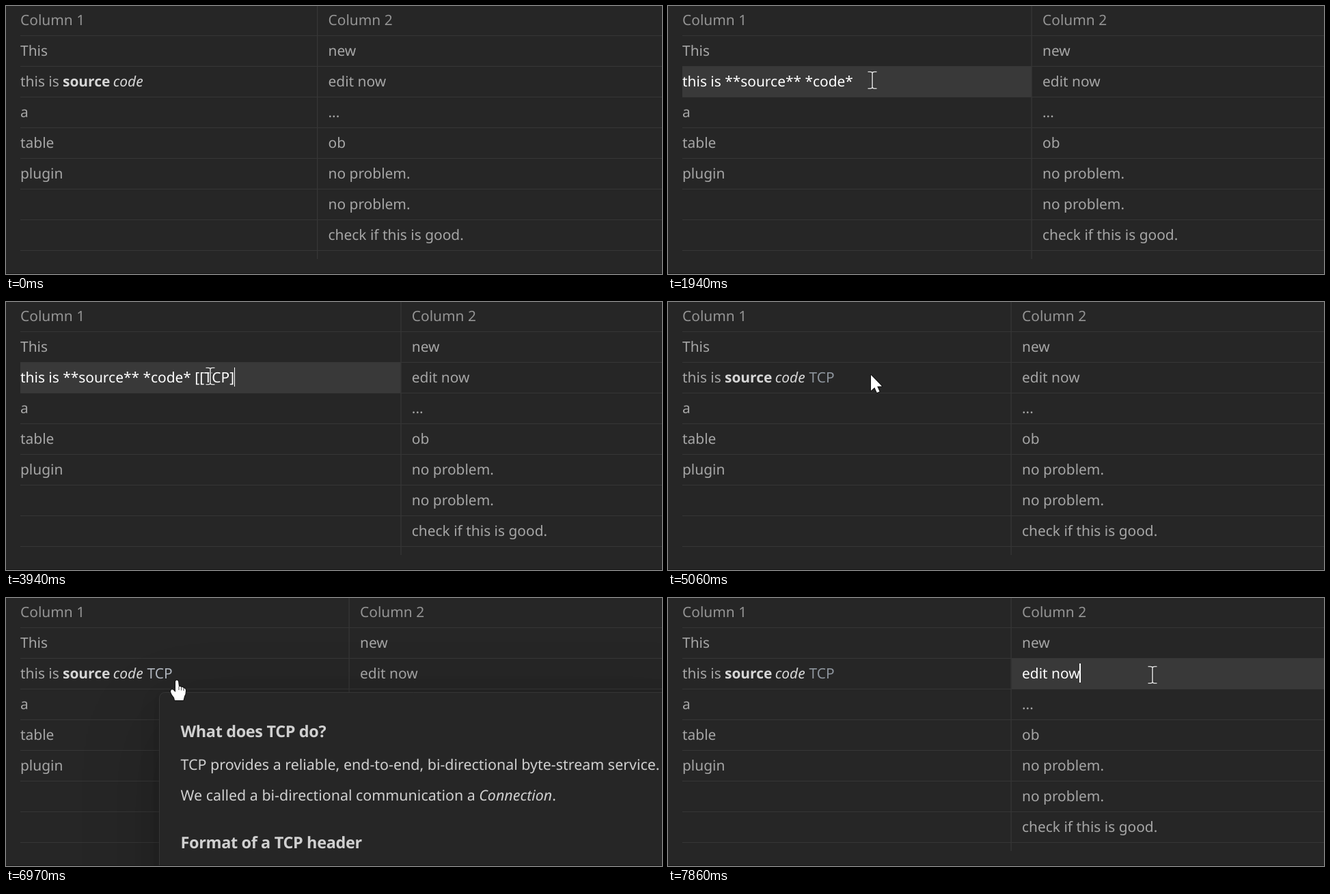
Write an HTML page with a canvas that moves like this. It is 960 px wide and 393 px high and loops after 8 s.

```html
<!DOCTYPE html>
<html lang="en">
<head>
<meta charset="utf-8">
<title>Editable table</title>
<style>
html, body { margin: 0; width: 100%; height: 100%; overflow: hidden; background: #262626; }
canvas { display: block; }
</style>
</head>
<body>
<canvas id="stage" width="960" height="393"></canvas>
<script>
const ctx = document.getElementById('stage').getContext('2d');
const LOOP = 8000, LEFT = 21, ROW = 45, SIZE = 20.93;
const FAMILY = '"Noto Sans", sans-serif';
const CELL = '#a6a6a6', LINE = '#363636', ACTIVE = '#393939', BRIGHT = '#d6d6d6';

const col1 = ['Column 1', 'This', '', 'a', 'table', 'plugin'];
const col2 = ['Column 2', 'new', 'edit now', '...', 'ob', 'no problem.', 'no problem.', 'check if this is good.'];

// Time, typed text after the base, divider position
const typing = [
  [800, '', 528], [1410, ' ', 532], [2210, ' [', 538], [2340, ' [[', 544.5],
  [3070, ' [[T', 553.3], [3270, ' [[TC', 563], [3540, ' [[TCP', 572],
  [3940, ' [[TCP]', 577.8], [4070, ' [[TCP]]', 582.3]
];
const EDIT_START = 800, EDIT_END = 5060, BLINK = 530;

// Pointer moves: start, end, number of steps, cubic Bezier points
const moves = [
  [120, 600, 8, [807, 385], [600, 260], [330, 110], [297, 107]],
  [5340, 6040, 11, [298, 112], [328, 165], [310, 195], [246, 119]],
  [6970, 7530, 9, [250, 121], [40, 108], [480, 112], [707, 111]]
];

// Popup shadow layers: offset, blur, opacity
const shadows = [[39, 118, 0.2], [8, 32, 0.11], [2.4, 9.5, 0.07]];

const arrow = new Path2D('M0 0V23L5.3 18.2L8.8 26L12.6 24.3L9.2 16.8L16 16.5Z');
const beam = new Path2D('M-6.5-12H-3Q0-12 0-9.5Q0-12 3-12H6.5M0-10V11M-6.5 12.5H-3Q0 12.5 0 10Q0 12.5 3 12.5H6.5');
const hand = new Path2D('M-2 1Q0-2 2 1L3 9Q5 8 6.5 10Q9 9 10 11.5Q13 11 13 15Q13 20 11 23L9.5 29H-3L-4 25Q-9 19 -9 15.5Q-8 12 -5 14L-2 17Z');

function text(str, x, y, color = CELL, style = '', size = SIZE) {
  ctx.font = `${style} ${size}px ${FAMILY}`;
  ctx.fillStyle = color;
  ctx.fillText(str, x, y);
  return x + ctx.measureText(str).width;
}

function rect(color, x, y, w, h) {
  ctx.fillStyle = color;
  ctx.fillRect(x, y, w, h);
}

function pointerAt(t) {
  const move = moves.filter(m => t >= m[0]).pop();
  if (!move) return null;
  const [start, end, steps, ...p] = move;
  const u = Math.min(1, Math.floor((t - start) / (end - start) * (steps - 1) + 0.01) / (steps - 1));
  const v = 1 - u;
  return [0, 1].map(k =>
    v * v * v * p[0][k] + 3 * v * v * u * p[1][k] + 3 * v * u * u * p[2][k] + u * u * u * p[3][k]);
}

function drawTable(t) {
  const typed = typing.filter(e => t >= e[0]).pop();
  const editing = t >= EDIT_START && t < EDIT_END;
  const editing2 = t >= 7730;
  const divider = t < EDIT_START ? 455.5 : editing ? typed[2] : 502;

  if (editing) rect(ACTIVE, LEFT, 89, divider - LEFT, 44);
  if (editing2) rect(ACTIVE, divider + 1, 89, 960 - divider, 44);
  for (let y = 43; y < 370; y += ROW) rect(LINE, LEFT, y, 939, 1);
  rect(LINE, divider - 0.5, 0, 1.3, 371);
  rect('#181818', 0, 392, 960, 1);

  const draw = (str, x, i) =>
    text(str, x, 28 + ROW * i, i === 0 ? '#949494' : editing2 && i === 2 && x > 400 ? '#fff' : CELL);
  col1.forEach((s, i) => draw(s, LEFT, i));
  col2.forEach((s, i) => draw(s, divider + 16, i));

  if (editing) {
    const end = text('this is **source** *code*' + typed[1], LEFT, 118, '#fff');
    if (t - typed[0] < BLINK || typed === typing[0]) rect('#fff', Math.floor(end), 96, 1, 28);
  } else {
    text('this is', LEFT, 118);
    text('source', 83, 118, BRIGHT, '600');
    text('code', 156.8, 118, BRIGHT, 'italic');
    if (t >= EDIT_END) text('TCP', 206.6, 118, t >= 6040 && t < 7040 ? '#b2b8c0' : '#8e959d');
  }
  if (t >= 7800) rect('#fff', 602, 96, 2, 28);
}

function drawPopup(t) {
  if (t < 6170 || t >= 7180) return;
  ctx.save();
  ctx.globalAlpha = t < 6240 ? 0.5 : 1;
  ctx.beginPath();
  ctx.roundRect(224.5, 138.5, 800, 520, 8);
  ctx.fillStyle = '#262626';
  for (const [offset, blur, opacity] of shadows) {
    ctx.shadowOffsetY = offset;
    ctx.shadowBlur = blur;
    ctx.shadowColor = `rgba(0,0,0,${opacity})`;
    ctx.fill();
  }
  ctx.shadowColor = 'transparent';
  ctx.strokeStyle = LINE;
  ctx.stroke();

  const x = 255.5, size = 21.43, color = '#d0d0d0';
  ctx.letterSpacing = '-0.36px';
  text('What does TCP do?', x, 204, color, '600', 23.46);
  text('Format of a TCP header', x, 367, color, '600', 23.46);
  ctx.letterSpacing = '0px';
  text('TCP provides a reliable, end-to-end, bi-directional byte-stream service.', x, 252, color, '', size);
  let end = text('We called a bi-directional communication a ', x, 297, color, '', size);
  end = text('Connection', end, 297, color, 'italic', size);
  text('.', end, 297, color, '', size);
  rect('#181818', 0, 392, 960, 1);
  ctx.restore();
}

function drawPointer(t) {
  const pos = pointerAt(t);
  if (!pos) return;
  const isBeam = t >= 890 && t < EDIT_END || t >= 7860;
  const isHand = t >= 6040 && t < 7040;
  ctx.save();
  ctx.translate(...pos);
  ctx.lineJoin = 'round';
  if (isBeam) {
    ctx.translate(2, 1.5);
    ctx.strokeStyle = '#2b2b2b';
    ctx.lineWidth = 3.4;
    ctx.stroke(beam);
    ctx.strokeStyle = '#d8d8d8';
    ctx.lineWidth = 1.6;
    ctx.stroke(beam);
  } else {
    const shape = isHand ? hand : arrow;
    ctx.strokeStyle = '#111';
    ctx.lineWidth = 2;
    ctx.stroke(shape);
    ctx.fillStyle = '#fff';
    ctx.fill(shape);
    if (isHand) {
      ctx.lineWidth = 0.8;
      ctx.stroke(new Path2D('M3 9V14M6.5 10V14.5M10 11.5V15'));
    }
  }
  ctx.restore();
}

const origin = performance.now();
function frame() {
  const t = (performance.now() - origin) % LOOP;
  ctx.textRendering = 'geometricPrecision';
  rect('#262626', 0, 0, 960, 393);
  drawTable(t);
  drawPopup(t);
  drawPointer(t);
  requestAnimationFrame(frame);
}
frame();
</script>
</body>
</html>
```
